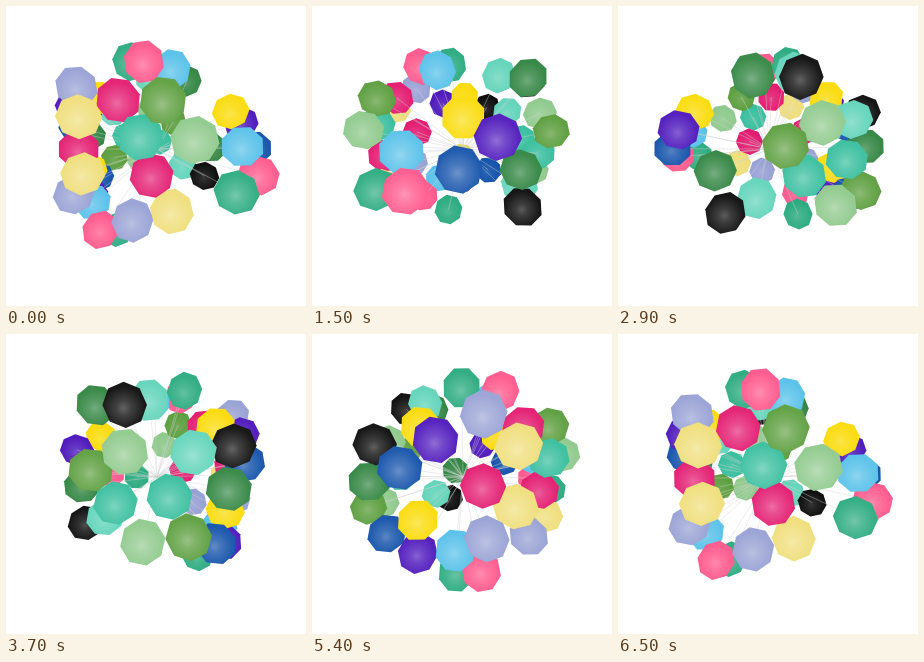
An HTML page with a canvas for the animation above (6600 ms loop, 300 px wide and 300 px high).

```html
<!DOCTYPE html>
<html lang="en">
<head>
<meta charset="utf-8">
<title>Turning balloons</title>
<style>
html, body { margin: 0; width: 100%; height: 100%; overflow: hidden; background: #fff; }
canvas { display: block; width: 100vw; height: 100vh; }
</style>
</head>
<body>
<canvas id="stage" width="300" height="300"></canvas>
<script>
const ctx = document.getElementById('stage').getContext('2d');
const STEP = 100, STEPS = 66;
const CX = 151, CY = 143, RADIUS = 16, PERSPECTIVE = 0.0035;
const SIN = 0.195, COS = 0.98; // camera tilt

// Per colour, three balloons: distance from the axis, angle in degrees, height.
const groups = {
  '255,88,140': [41, -15, -80, 99, 58, 12, 65, -52, 67],
  '227,27,112': [71, -24, -50, 80, -55, -9, 76, -3, 5],
  '98,212,186': [38, 192, -72, 58, 148, 30, 80, 221, -33],
  '56,190,158': [84, -8, -25, 83, 208, -2, 78, 178, 6],
  '44,171,128': [26, -68, -83, 97, 38, 18, 42, -74, 81],
  '50,133,66': [62, 147, -68, 92, 237, -6, 73, 122, 6],
  '92,158,62': [80, 3, -50, 85, 166, -19, 92, 216, 26],
  '143,201,140': [93, 16, -24, 83, 186, -34, 87, 195, 31],
  '14,14,14': [65, 180, -67, 88, -118, -37, 71, 128, 41],
  '152,161,212': [79, -55, -60, 87, -54, 29, 74, -15, 43],
  '250,219,10': [70, 82, -38, 59, -100, -50, 70, -97, 24],
  '239,222,122': [90, -40, -38, 89, -40, 6, 80, 8, 32],
  '78,24,188': [87, 98, -25, 78, -80, -42, 70, -98, 53],
  '20,82,170': [92, 80, -4, 85, -99, -21, 80, -122, 42],
  '88,193,233': [28, 27, -75, 88, 51, -13, 65, -71, 48]
};

const balloons = [];
for (const [color, v] of Object.entries(groups))
  for (let i = 0; i < 9; i += 3)
    balloons.push({ color, dist: v[i], angle: v[i + 1] * Math.PI / 180, height: v[i + 2] });

function project(b, turn) {
  const a = b.angle - turn;
  const x = b.dist * Math.sin(a), depth = b.dist * Math.cos(a);
  const y = COS * b.height + SIN * depth;
  const z = COS * depth - SIN * b.height;
  const scale = 1 / (1 - PERSPECTIVE * z);
  return { color: b.color, x: x * scale, y: y * scale, z, scale, tilt: Math.hypot(x, y) / Math.hypot(x, y, z) };
}

function drawString(p) {
  ctx.beginPath();
  ctx.moveTo(CX, CY);
  ctx.lineTo(CX + p.x, CY + p.y);
  ctx.strokeStyle = 'rgba(208,210,206,.7)';
  ctx.lineWidth = 0.6;
  ctx.stroke();
}

function drawBalloon(p) {
  const r = RADIUS * p.scale, heading = Math.atan2(p.y, p.x);
  const lift = Math.min(1, Math.max(0, (p.z + 90) / 180));
  ctx.save();
  ctx.translate(CX + p.x, CY + p.y);
  ctx.rotate(heading);
  ctx.scale(1 + 0.1 * p.tilt, 1);
  ctx.beginPath();
  for (let i = 0; i < 8; i++) {
    const a = (i + 0.5) * Math.PI / 4;
    ctx.lineTo(r * 1.03 * Math.cos(a), r * 1.03 * Math.sin(a));
  }
  ctx.closePath();
  ctx.restore();

  ctx.fillStyle = `rgb(${p.color})`;
  ctx.fill();
  const hx = CX + p.x - 0.05 * r, hy = CY + p.y + 0.15 * r;
  const shine = ctx.createRadialGradient(hx, hy, 0, hx, hy, r);
  shine.addColorStop(0, `rgba(255,255,255,${0.12 + 0.26 * lift})`);
  shine.addColorStop(0.35, `rgba(255,255,255,${0.06 + 0.17 * lift})`);
  shine.addColorStop(1, `rgba(255,255,255,${0.05 * lift})`);
  ctx.fillStyle = shine;
  ctx.fill();
}

function draw(now) {
  const turn = Math.floor(now / STEP) % STEPS / STEPS * 2 * Math.PI;
  ctx.fillStyle = '#fff';
  ctx.fillRect(0, 0, 300, 300);
  const parts = balloons.flatMap(b => {
    const p = project(b, turn);
    return [{ z: p.z / 2, paint: () => drawString(p) }, { z: p.z, paint: () => drawBalloon(p) }];
  });
  parts.sort((a, b) => a.z - b.z).forEach(part => part.paint());
}

const start = performance.now();
function loop() {
  draw(performance.now() - start);
  requestAnimationFrame(loop);
}
loop();
</script>
</body>
</html>
```
